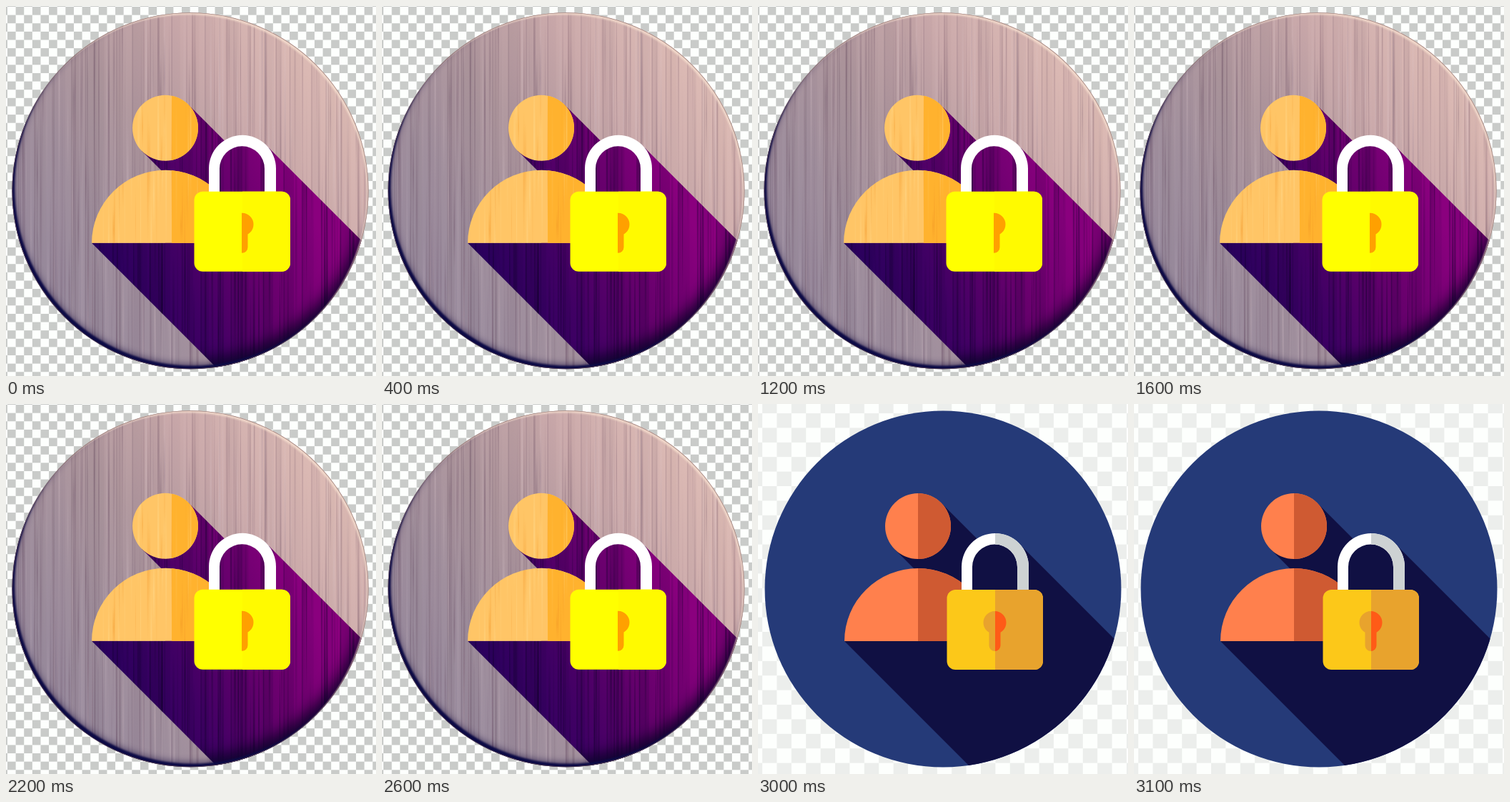
An HTML page with a canvas for the animation above (6000 ms loop, 518 by 518 pixels).

```html
<!DOCTYPE html>
<html lang="en">
<head>
<meta charset="utf-8">
<style>
html, body { margin: 0; width: 100%; height: 100%; overflow: hidden; background: #fff; }
canvas { display: block; width: 100vw; height: 100vh; }
</style>
</head>
<body>
<canvas id="stage" width="518" height="518"></canvas>
<script>
const SIZE = 518, LOOP = 6000, SWITCH = 3000;
const stage = document.getElementById('stage').getContext('2d');

let seed = 7;
const rand = () => (seed = (seed * 16807) % 2147483647) / 2147483647;

function shape(draw) {
  const p = new Path2D();
  draw(p);
  return p;
}
const disc = shape(p => p.arc(259, 259, 249.5, 0, 7));
const person = shape(p => {
  p.arc(224, 171, 46, 0, 7);
  p.closePath();
  p.moveTo(121, 332);
  p.ellipse(224, 332, 103, 102, 0, Math.PI, 2 * Math.PI);
  p.closePath();
});
const shackle = shape(p => {
  p.moveTo(285, 262);
  p.lineTo(285, 228);
  p.arc(332, 228, 47, Math.PI, 0);
  p.lineTo(379, 262);
  p.lineTo(363, 262);
  p.lineTo(363, 228);
  p.arc(331.5, 228, 31.5, 0, Math.PI, true);
  p.lineTo(300, 262);
  p.closePath();
});
const box = shape(p => p.roundRect(264.5, 260, 134.5, 112, 12));
const keyhole = shape(p => {
  p.arc(331.5, 306, 16, 0, 7);
  p.closePath();
  p.roundRect(323.5, 306, 16, 40, 8);
});
const shadow = new Path2D('M191 203L256.5 138.5 308 190 332 188 365 195 600 430V600H389L121 332H224V236Z');

function gradient(g, x0, y0, x1, y1, ...colors) {
  const fill = g.createLinearGradient(x0, y0, x1, y1);
  colors.forEach((c, i) => fill.addColorStop(i / (colors.length - 1), c));
  return fill;
}

function clipped(g, path, draw) {
  g.save();
  g.clip(path);
  draw();
  g.restore();
}

function halves(g, path, left, right, mid) {
  g.fillStyle = left;
  g.fill(path);
  clipped(g, path, () => {
    g.fillStyle = right;
    g.fillRect(mid, 0, SIZE, SIZE);
  });
}

function checker(g, cell, ox, oy, color) {
  g.fillStyle = '#fdfffd';
  g.fillRect(0, 0, SIZE, SIZE);
  g.fillStyle = color;
  for (let j = -1; j * cell < SIZE + cell; j++)
    for (let i = -1; i * cell < SIZE + cell; i++)
      if ((i + j) & 1) g.fillRect(ox + i * cell, oy + j * cell, cell, cell);
}

// Thin vertical fibres, each fading out at both ends
function grain(g, count, rgb, alpha, x0 = 0, x1 = SIZE, y0 = 0, y1 = SIZE) {
  for (let i = 0; i < count; i++) {
    const x = x0 + rand() * (x1 - x0);
    const h = (0.2 + rand() * 0.8) * (y1 - y0);
    const y = y0 + rand() * (y1 - y0) - h * 0.4;
    const a = alpha * (0.3 + 0.7 * rand());
    g.fillStyle = gradient(g, 0, y, 0, y + h, `rgba(${rgb},0)`, `rgba(${rgb},${a})`, `rgba(${rgb},0)`);
    g.fillRect(x, y, 0.7 + rand() * 2.3, h);
  }
}

function planks(g, rgb, alpha) {
  for (let x = 0; x < SIZE; x += 12 + rand() * 20) {
    g.fillStyle = `rgba(${rgb},${alpha * rand()})`;
    g.fillRect(x, 0, 8 + rand() * 12, SIZE);
    g.fillStyle = `rgba(${rgb},${alpha * 2})`;
    g.fillRect(x, 0, 1.2, SIZE);
  }
}

function flat(g) {
  checker(g, 20.4, 6, 13, '#eceeec');
  g.fillStyle = '#253a78';
  g.fill(disc);
  clipped(g, disc, () => {
    g.fillStyle = '#101043';
    g.fill(shadow);
  });
  halves(g, person, '#ff804d', '#cf5a32', 224);
  halves(g, shackle, '#fff', '#cdd2d3', 332);
  halves(g, box, '#fcc819', '#e8a32d', 332);
  halves(g, keyhole, '#e8a32d', '#ff5b17', 332);
}

// Crescent left uncovered by a shifted disc
function crescent(g, dx, dy, color, blur) {
  const p = shape(p => {
    p.rect(-50, -50, 618, 618);
    p.moveTo(508.5 + dx, 259 + dy);
    p.arc(259 + dx, 259 + dy, 249.5, 0, 7);
  });
  g.filter = `blur(${blur}px)`;
  g.fillStyle = color;
  g.fill(p, 'evenodd');
  g.filter = 'none';
}

function rim(g) {
  crescent(g, 3, -7, 'rgba(20,10,60,.55)', 5);
  crescent(g, 3.5, -4.5, '#0c0a45', 1);
  crescent(g, -2.5, 3, 'rgba(248,224,208,.8)', 0.8);
  g.lineWidth = 1.6;
  g.strokeStyle = 'rgba(125,95,95,.7)';
  g.stroke(disc);
}

function wood(g) {
  checker(g, 11.62, 2, 1, '#c9cbc9');
  g.translate(-1, -0.2);
  clipped(g, disc, () => {
    g.fillStyle = gradient(g, 30, 390, 450, 110, '#96899d', '#a08f9d', '#b1999f', '#cbaaab', '#dcbab4');
    g.fillRect(0, 0, SIZE, SIZE);
    planks(g, '90,65,85', 0.09);
    grain(g, 220, '85,55,80', 0.28);
    grain(g, 130, '225,205,210', 0.25);

    clipped(g, shadow, () => {
      g.fillStyle = gradient(g, 150, 400, 430, 290, '#28005c', '#400064', '#66006c', '#8a007e');
      g.fillRect(0, 0, SIZE, SIZE);
      planks(g, '15,0,45', 0.14);
      grain(g, 180, '15,0,40', 0.5);
      crescent(g, -3, -14, 'rgba(8,0,35,.8)', 10);
    });
    rim(g);
  });

  halves(g, person, '#ffc566', '#ffb22e', 233);
  clipped(g, person, () => {
    grain(g, 40, '240,145,35', 0.35, 115, 330, 120, 335);
    grain(g, 30, '255,220,145', 0.45, 115, 330, 120, 335);
  });
  g.fillStyle = '#fff';
  g.fill(shackle);
  halves(g, box, '#ff0', '#fffa00', 332);
  clipped(g, keyhole, () => {
    g.fillStyle = '#ffa000';
    g.fillRect(331, 288, 20, 60);
  });
}

function paint(draw) {
  const c = document.createElement('canvas');
  c.width = c.height = SIZE;
  draw(c.getContext('2d'));
  return c;
}
const scenes = [paint(wood), paint(flat)];

const start = performance.now();
function frame() {
  const t = (performance.now() - start) % LOOP;
  stage.drawImage(scenes[t < SWITCH ? 0 : 1], 0, 0);
  requestAnimationFrame(frame);
}
frame();
</script>
</body>
</html>
```
